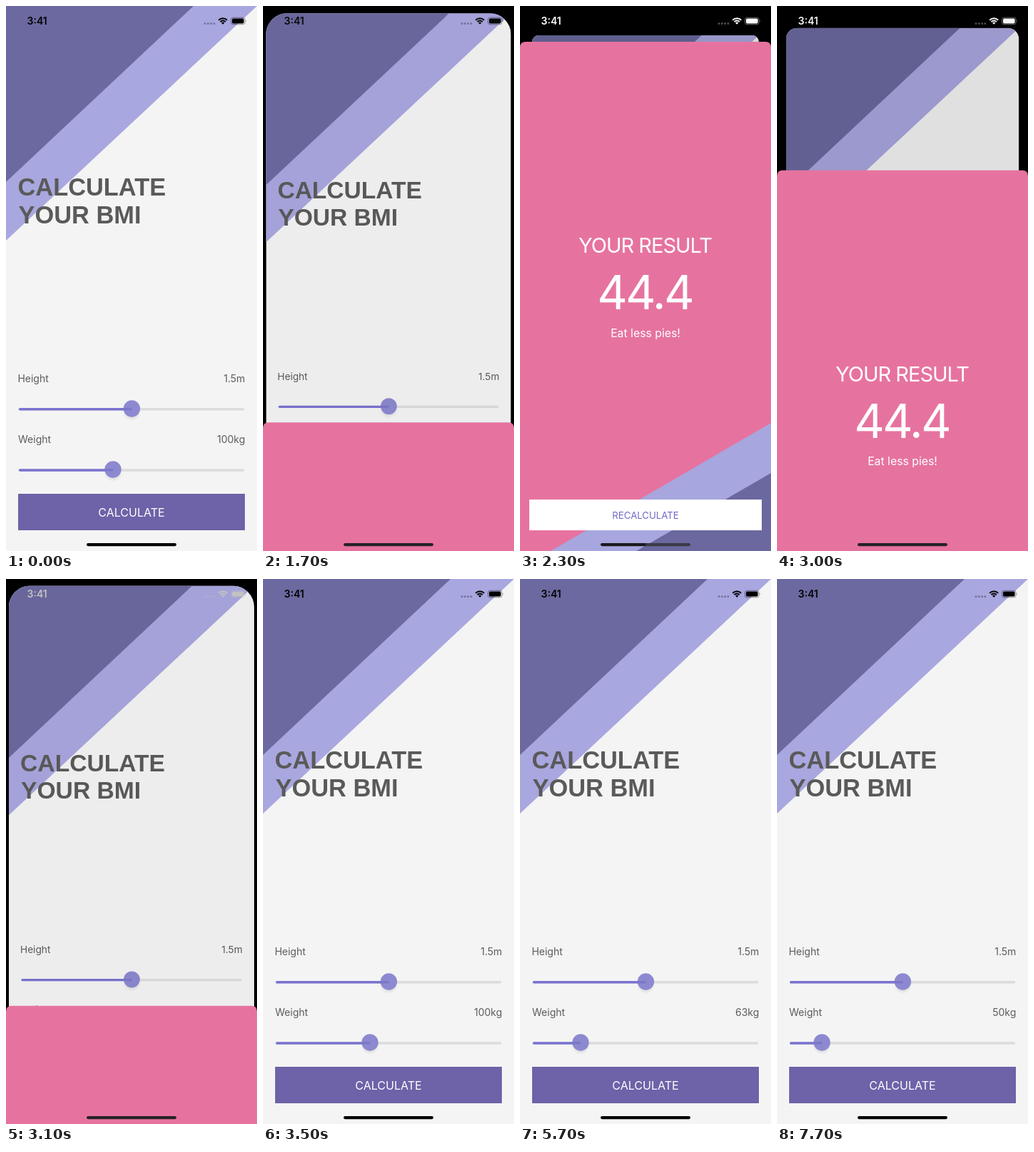
These frames come from a looping animation (352x762 px, 8 s). An HTML page:

```html
<!DOCTYPE html>
<html lang="en">
<head>
<meta charset="utf-8">
<title>BMI calculator</title>
<style>
  html, body { margin: 0; width: 100%; height: 100%; overflow: hidden; background: #000; }
  svg { display: block; width: 352px; height: 762px; }
  text { font-family: Inter, Roboto, sans-serif; }
  .title { font: bold 34.4px "Liberation Sans", Arial, sans-serif; fill: #5a5a5a; }
  .label { font-size: 14px; fill: #5c5c5c; }
  .mid { text-anchor: middle; }
  .end { text-anchor: end; }
</style>
</head>
<body>
<svg viewBox="0 0 352 762">
  <defs>
    <clipPath id="corners"><rect id="cornerBox" width="352" height="762"/></clipPath>
    <filter id="soft" x="-50%" y="-50%" width="200%" height="200%"><feGaussianBlur stdDeviation="1.8"/></filter>
    <linearGradient id="barTint">
      <stop offset=".5" stop-color="#1b191d"/><stop offset=".5" stop-color="#3c3a46"/>
    </linearGradient>
    <g id="thumb">
      <circle cy="4" r="11" opacity=".07" filter="url(#soft)"/>
      <circle r="11.7" fill="#8d89d0"/>
      <path d="M-11.5 .8H0" stroke="#7d77c8" stroke-width="3.4"/>
    </g>
  </defs>
  <rect width="352" height="762"/>

  <g id="home"><g clip-path="url(#corners)">
    <rect width="352" height="762" fill="#f4f4f4"/>
    <path d="M0 0H352L0 328Z" fill="#a9a7df"/>
    <path d="M0 0H263L0 246Z" fill="#6b699f"/>
    <text class="title" x="16.5" y="265">CALCULATE</text>
    <text class="title" x="17.5" y="304">YOUR BMI</text>
    <text class="label" x="16.4" y="525.6">Height</text>
    <text class="label end" x="335.3" y="525.6">1.5m</text>
    <text class="label" x="17" y="610.8">Weight</text>
    <text class="label end" x="335.3" y="610.8" id="kg"></text>
    <g stroke-width="3.5" stroke-linecap="round">
      <path d="M19.5 563.8H332.5M19.5 649H332.5" stroke="#dcdcdf"/>
      <path d="M19.5 563.8H176" stroke="#7a73d0"/>
      <path id="fill" stroke="#7a73d0"/>
    </g>
    <use href="#thumb" x="176.4" y="563"/>
    <use href="#thumb" y="648" id="knob"/>
    <rect x="17" y="682" width="318" height="51" fill="#6e62a8"/>
    <text class="mid" x="176" y="713.5" font-size="16" fill="#fff">CALCULATE</text>
    <rect id="dim" width="352" height="762"/>
  </g></g>

  <g id="sheet">
    <path d="M0 762V58Q0 50 8 50H344Q352 50 352 58V762Z" fill="#e6739f"/>
    <path d="M352 583V762H43Z" fill="#a7a6de"/>
    <path d="M352 653V762H163Z" fill="#6a689f"/>
    <g class="mid" fill="#fff">
      <text x="175.5" y="345" font-size="29" letter-spacing="-1">YOUR RESULT</text>
      <text x="175" y="424" font-size="66" letter-spacing="-2.8">44.4</text>
      <text x="176" y="462.5" font-size="15.8">Eat less pies!</text>
    </g>
    <rect x="13" y="690" width="326" height="43" fill="#fff"/>
    <text class="mid" x="176" y="716.8" font-size="13.2" fill="#7066c4">RECALCULATE</text>
  </g>

  <g id="status">
    <text x="29.6" y="26.2" font-size="14" font-weight="600" fill="currentColor">3:41</text>
    <path d="M279 24.6h0m4.3 0h0m4.3 0h0m4.3 0h0" stroke="currentColor" stroke-width="3" stroke-linecap="round" opacity=".3"/>
    <path d="M304.2 25.8l-2.2 -2.2a3.1 3.1 0 0 1 4.4 0Z" fill="currentColor"/>
    <path d="M300.5 22.1a5.2 5.2 0 0 1 7.4 0M298.2 19.8a8.5 8.5 0 0 1 12 0" fill="none" stroke="currentColor" stroke-width="2"/>
    <rect x="315.5" y="16.2" width="19.6" height="9.6" rx="2.8" fill="none" stroke="currentColor" opacity=".4"/>
    <rect x="317" y="17.6" width="16.6" height="6.8" rx="1.6" fill="currentColor"/>
    <path d="M336.3 19.4q1.8 1.6 0 3.2Z" fill="currentColor" opacity=".45"/>
  </g>
  <rect id="bar" x="113" y="751" width="126" height="4.2" rx="2.1"/>
</svg>
<script>
const $ = id => document.getElementById(id);
const set = (id, attrs) => { for (const k in attrs) $(id).setAttribute(k, attrs[k]); };

const LOOP = 8000, STEP = 100, OPEN = 1647, CLOSE = 2947;
const WEIGHT = [[0, 100], [4900, 100], [5800, 61.3], [6500, 52], [6600, 52],
                [6800, 51], [7500, 51], [7700, 50], [LOOP, 50]];

const smooth = x => { x = Math.min(1, Math.max(0, x)); return x * x * (3 - 2 * x); };

// Critically damped spring from 0 to 1
function spring(ms) {
  const w = Math.max(0, ms) * 0.01826;
  return 1 - (1 + w) * Math.exp(-w);
}

function weightAt(t) {
  const i = WEIGHT.findIndex(k => k[0] > t);
  const [t0, a] = WEIGHT[i - 1], [t1, b] = WEIGHT[i];
  return a + (b - a) * smooth((t - t0) / (t1 - t0));
}

function draw(t) {
  let p = spring(t - OPEN) - spring(t - CLOSE);
  if (p < 0.001) p = 0;
  const scale = 1 - 0.097 * p;
  set("home", { transform: `translate(${176 * (1 - scale)} ${41 * p}) scale(${scale})` });
  set("cornerBox", { rx: p ? (36 - 27 * p) / scale : 0 });
  set("dim", { opacity: 0.11 * p });
  set("sheet", { transform: `translate(0 ${712 * (1 - p)})` });

  const light = smooth((t - OPEN) / 480) - smooth((t - CLOSE) / 480);
  const c = Math.round(255 * light);
  $("status").style.color = `rgb(${c},${c},${c})`;
  set("bar", { fill: p > 0.8 ? "url(#barTint)" : p ? "#262125" : "#000" });

  const kg = weightAt(t), x = 63 + (kg - 50) * 1.74;
  $("kg").textContent = Math.round(kg) + "kg";
  set("fill", { d: `M19.5 649H${x}` });
  set("knob", { x });
}

const start = performance.now();
function tick() {
  const t = (performance.now() - start) % LOOP;
  draw(Math.floor(t / STEP) * STEP);
  requestAnimationFrame(tick);
}
tick();
</script>
</body>
</html>
```
